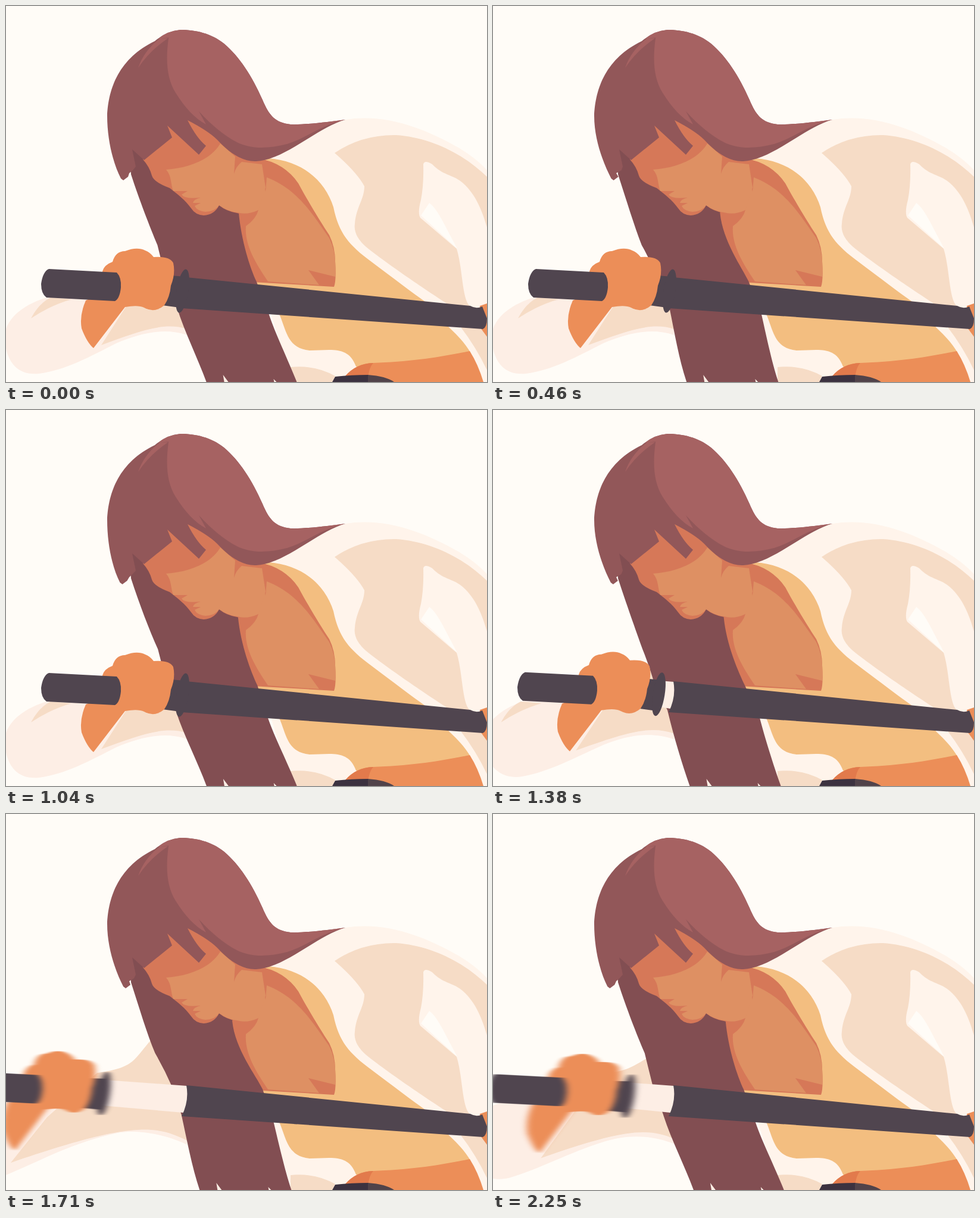
These frames come from a looping animation (808x632 px, 2.29 s). An HTML page:

```html
<!DOCTYPE html>
<html lang="en">
<head>
<meta charset="utf-8">
<title>Drawing the sword</title>
<style>
  html, body { margin: 0; width: 100%; height: 100%; overflow: hidden; background: #fffcf7; }
  svg { display: block; width: 808px; height: 632px; }
  .cream { fill: #fff4eb; }
  .tan { fill: #f6dcc6; }
  .pink { fill: #fdeee5; }
  .white { fill: #fffcf7; }
  .yellow { fill: #f3be80; }
  .skin { fill: #de9063; }
  .shade { fill: #d67858; }
  .orange { fill: #ec8e58; }
  .dark { fill: #50454f; }
  .strand { fill: #824e52; }
  .hair { fill: #925759; }
  .shine { fill: #a66262; }
</style>
</head>
<body>
<svg viewBox="0 0 808 632">
  <defs>
    <filter id="blur" filterUnits="userSpaceOnUse" x="-60" y="380" width="600" height="220" color-interpolation-filters="sRGB">
      <feGaussianBlur id="smear" stdDeviation="0 0"/>
    </filter>
  </defs>

  <!-- left sleeve -->
  <path id="sleeve" class="pink"/>
  <path id="fold" class="tan"/>
  <path id="lining" class="tan"/>

  <!-- robe -->
  <path class="cream" d="M425 262C500 235 540 196 570 191C640 180 705 207 760 238Q790 256 808 276V632H480L440 500Z"/>
  <path class="tan" d="M552 247Q598 216 655 217C715 221 770 250 808 287V505H748C725 490 650 441 605 405Q583 386 586 366C588 338 602 325 602 303Q590 280 552 247Z"/>
  <path class="cream" d="M701 266Q703 258 716 266C735 286 752 283 768 298C790 318 800 345 808 372V500Q790 514 778 503C766 490 767 440 757 408L696 356Q691 348 697 326Q702 300 701 266Z"/>
  <path class="white" d="M697 352L711 331Q722 338 739 372L758 408Z"/>
  <path class="tan" d="M764 540H808V612Q790 574 764 540ZM478 607Q520 603 553 622L548 632H478Z"/>

  <!-- shirt and leg -->
  <path class="yellow" d="M400 256H440C500 260 537 296 550 338C559 382 576 402 614 430C650 457 680 480 704 497L745 541Q770 564 781 584L600 612L588 606C575 570 545 579 510 579C474 575 472 550 460 520L410 455Z"/>
  <path class="orange" d="M570 622Q588 601 616 600C680 598 730 590 779 580Q793 602 802 632H570Z"/>
  <path fill="#e27a4c" d="M570 622Q588 601 617 600Q608 610 608 632H570Z"/>
  <path fill="#3c3240" d="M548 632L553 623Q580 620 609 620V632Z"/>
  <path fill="#51434a" d="M608 620Q638 622 652 632H608Z"/>

  <!-- chest -->
  <path class="shade" d="M365 335L424 256Q468 264 491 298C506 326 528 362 543 385Q553 405 553 430Q555 462 551 472L380 462Z"/>
  <path class="skin" d="M424 343Q420 358 403 370C400 405 425 440 440 463L526 469L508 444L553 455Q556 415 543 390C515 350 490 308 438 288L436 312Q430 280 412 262L390 262V300Z"/>

  <path id="strand" class="strand"/>
  <path id="slits" class="pink"/>

  <!-- face -->
  <path class="shade" d="M230 258L262 195L305 185L360 225L390 250L425 262L424 343Q400 352 388 348Q370 345 358 335Q350 351 332 352Q318 351 311 340C300 325 290 318 275 306Q248 296 245 285Q241 270 230 258Z"/>
  <path class="skin" d="M269 275C310 272 345 257 360 231L385 253L383 282Q386 270 396 262L430 266L436 305L424 343Q405 352 388 347Q372 345 358 335Q352 345 335 346Q320 344 317 336L327 331L314 331Q315 325 327 322Q300 325 295 317L305 311L281 311C276 298 279 287 269 275Z"/>

  <!-- head -->
  <path id="hair" class="hair"/>
  <path class="shine" d="M273 54C268 92 270 122 285 146C300 170 318 190 336 199L324 177C347 202 367 218 388 229C412 241 440 240 472 232C505 222 525 202 570 191C540 195 500 200 478 199C452 196 442 184 431 158C413 117 392 85 366 63C345 46 318 40 293 40Q270 42 256 55ZM222 104Q232 75 258 55L274 53Q242 74 222 104Z"/>

  <!-- sword -->
  <path class="orange" d="M796 504L808 500V556L797 541Z"/>
  <path id="blade" class="pink"/>
  <path class="dark" d="M303 456L780 504Q790 510 800 505L808 525Q808 540 801 543L295 508Q308 482 303 456Z"/>
  <g id="hilt">
    <path class="dark" d="M255 451L300 455L292 507L255 502Z"/>
    <ellipse class="dark" cx="296.5" cy="479" rx="10" ry="37" transform="rotate(9 296.5 479)"/>
    <path class="orange" d="M162 446Q165 435 179 430Q184 412 200 412Q220 404 234 411Q242 414 248 422Q275 420 281 432Q285 450 277 470Q275 490 266 503Q250 517 232 507Q222 502 200 506L147 575Q136 566 127 542Q123 520 134 495L165 480Z"/>
    <path class="dark" d="M72 442L186 448Q194 456 193 473Q191 492 183 496L68 490Q59 484 59 467Q62 446 72 442Z"/>
  </g>
</svg>
<script>
const LOOP = 2290, SWAY = LOOP / 2;
const $ = id => document.getElementById(id);
const draw = (id, d) => $(id).setAttribute('d', d);

// time and horizontal offset of the hilt
const pull = [[0, 0], [1130, 0], [1380, -18], [1590, -22], [1630, -45], [1670, -92], [1710, -132],
  [1750, -139], [2130, -139], [2170, -135], [2210, -112], [2250, -71], [2290, 0]];

function offset(t) {
  const i = Math.max(1, pull.findIndex(k => k[0] >= t));
  const [t0, a] = pull[i - 1], [t1, b] = pull[i];
  return a + (b - a) * (t - t0) / (t1 - t0);
}

// blend two paths that share the same commands
function morph(a, b, u) {
  const target = b.match(/-?\d+/g);
  let i = 0;
  return a.replace(/-?\d+/g, n => (+n + (target[i++] - n) * u).toFixed(2));
}

const shapes = {
  sleeve: ['M-2 550C5 515 45 496 75 488L200 500L304 500L304 553C265 540 225 550 185 567C140 590 100 612 55 618C10 622 -3 585 -2 550Z',
    'M-110 550C-100 510 -60 480 -30 480L200 500L304 500L304 556C260 535 215 530 190 534C110 550 60 580 0 605C-40 622 -100 600 -110 550Z'],
  fold: ['M42 525Q55 500 75 490L110 493Q75 503 42 525Z',
    'M-178 525Q-165 500 -145 490L-110 493Q-145 503 -178 525Z'],
  lining: ['M160 570L203 503L209 440C230 440 250 440 275 445L304 445L304 543C265 530 220 548 160 570Z',
    'M0 587L62 510L150 435C215 425 210 415 243 375L304 400L304 549C250 522 210 515 0 587Z']
};

function drawHair(t) {
  const wave = (amp, peak) => amp * Math.cos(2 * Math.PI * (t - peak) / SWAY);
  const top = wave(5.5, 20), mid = wave(-5.5, 50), below = wave(5.5, 430), low = wave(6, -65), lock = wave(4, 380);
  const left = 331 + low, right = 484 + low * .8;
  draw('strand', `M207 236L210 283C224 326 ${239 + top * .4} 370 ${252.5 - below * .5} 402
    Q${264 + mid * .5} 430 ${273.5 + mid} 458L${290.5 + below} 505
    C${301 + below * .6} 545 ${317 + low * .9} 592 ${left} 632
    H${right}C${471 + low * .6} 596 ${454 + below * .7} 548 ${445.5 + below} 518L${426 + mid} 463
    C${415 + mid} 440 ${390 + top} 395 ${385.5 + top} 348L385 325L300 290L235 240Z`);
  draw('slits', `M${left + 28} 620L${left + 37} 632H${left + 30}ZM${right - 39} 627L${right - 34} 632H${right - 38}Z`);
  const tip = 199 + lock;
  draw('hair', `M570 191C540 195 500 200 478 199C452 196 442 184 431 158C413 117 392 85 366 63
    C345 46 318 40 293 40Q270 42 250 59C190 88 172 138 170 185C170 225 ${tip - 17} 265 ${tip - 4} 290
    L${tip} 293L${tip + 8} 287L207 281L${214 + lock * .5} 276L218 270L212 241L232 259L279 221L271 201
    L324 250L336 235Q320 222 305 192Q340 210 355 225C375 247 398 262 420 261C470 258 520 206 570 191Z`);
}

function drawSword(t, x) {
  const y = x * .07;
  const speed = Math.abs(x - offset(Math.max(0, t - 20))) / 20;
  const blur = speed > .3 ? speed * 5.5 : 0;
  draw('blade', `M${295 + x} ${456 + y}L304 457L309 478L298 502L${290 + x} ${499 + y}Z`);
  $('smear').setAttribute('stdDeviation', `${blur} 0`);
  $('hilt').setAttribute('filter', blur ? 'url(#blur)' : 'none');
  $('hilt').setAttribute('transform', `translate(${x} ${y})`);
}

function frame(now) {
  const t = now % LOOP, x = offset(t);
  for (const id in shapes) draw(id, morph(...shapes[id], -x / 139));
  drawHair(t);
  drawSword(t, x);
  requestAnimationFrame(frame);
}
frame(0);
</script>
</body>
</html>
```
